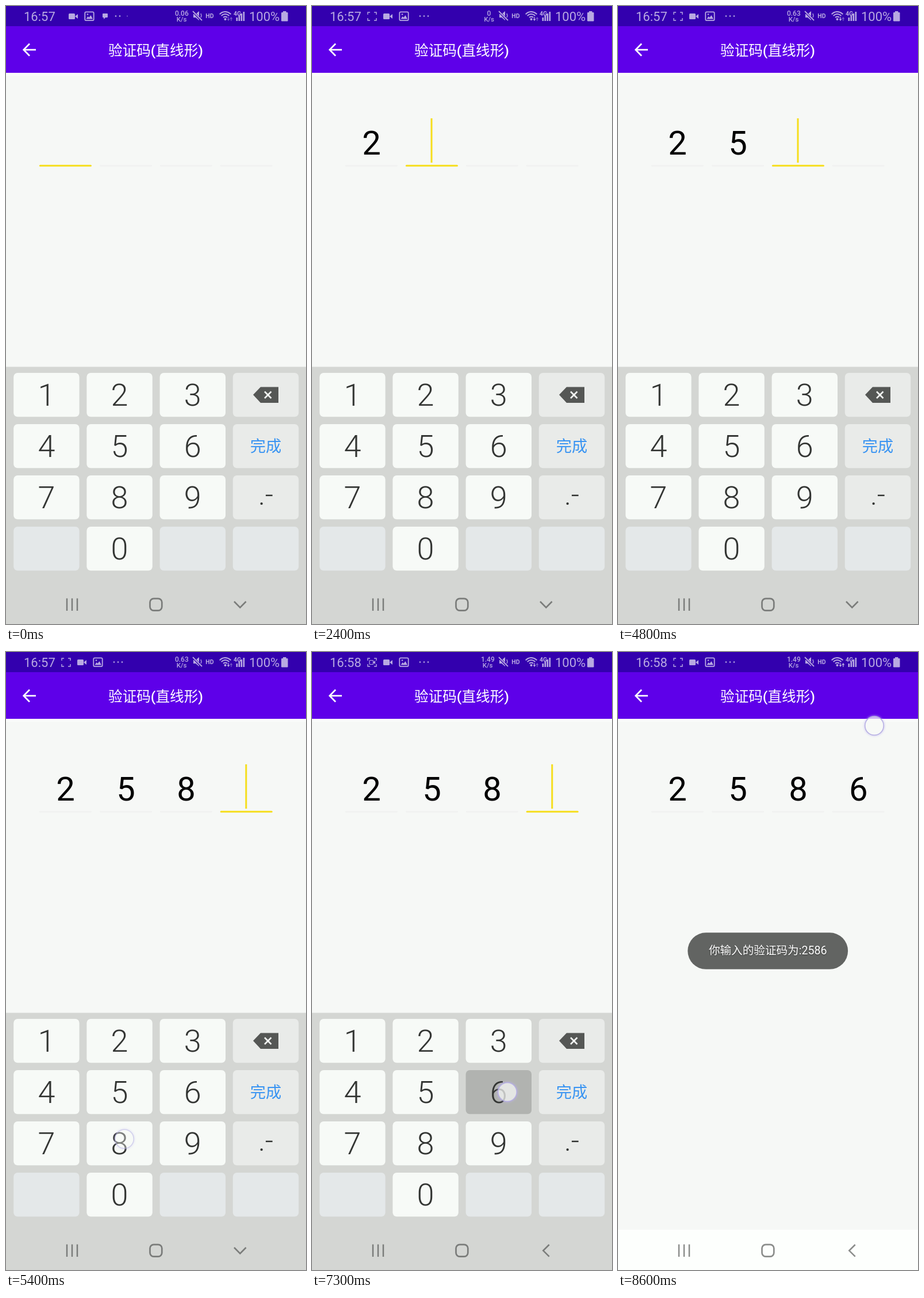
An HTML page with a canvas for the animation above (8800 ms loop, 522 px wide and 1073 px high).

```html
<!DOCTYPE html>
<html lang="zh-CN">
<head>
<meta charset="utf-8">
<title>验证码</title>
<style>
  html, body { margin: 0; width: 100%; height: 100%; overflow: hidden; background: #f6f8f6; }
  canvas { display: block; width: 522px; height: 1073px; }
</style>
</head>
<body>
<canvas id="stage" width="522" height="1073"></canvas>
<script>
const ctx = document.getElementById('stage').getContext('2d');
const LOOP = 8800;
const FONT = 'Roboto, "Noto Sans CJK SC", "Noto Sans CJK", sans-serif';
const YELLOW = '#f6de1c', STATUS = '#b8a9e2';
const KEYS = ['1', '2', '3', 'del', '4', '5', '6', '完成', '7', '8', '9', '.-', '', '0', '', ''];
const CELLS = [103.5, 208.5, 313.5, 418.3];

// Digits appear when their key is released
const ENTRIES = [[1700, '2'], [3420, '5'], [5360, '8'], [7400, '6']];
const CURSOR_ON = [[200, 700], [1200, 1700], [2200, 2800], [3300, 3420], [3800, 4300],
  [4800, 5300], [5360, 5800], [6300, 6800], [7300, 7400]];
const TOUCHES = [
  { x: 200, y: 675, down: 1500, up: 1680, key: 1 },
  { x: 203, y: 764, down: 3290, up: 3410, key: 5 },
  { x: 206, y: 845.5, down: 5180, up: 5320, key: 9 },
  { x: 340, y: 764, down: 7200, up: 7350, key: 6 },
  { x: 446, y: 128, down: 8560, up: 9000, key: -1 }
];

const clamp = v => Math.max(0, Math.min(1, v));
const mix = (a, b, k) => a + (b - a) * k;
const ramp = (t, a, b) => clamp((t - a) / (b - a));

function rect(x, y, w, h, color) {
  ctx.fillStyle = color;
  ctx.fillRect(x, y, w, h);
}

function round(x, y, w, h, r, color) {
  ctx.beginPath();
  ctx.roundRect(x, y, w, h, r);
  ctx.fillStyle = color;
  ctx.fill();
}

function poly(pts, color) {
  ctx.beginPath();
  pts.forEach(p => ctx.lineTo(p[0], p[1]));
  ctx.fillStyle = color;
  ctx.fill();
}

function line(pts, color, width) {
  ctx.beginPath();
  pts.forEach(p => ctx.lineTo(p[0], p[1]));
  ctx.strokeStyle = color;
  ctx.lineWidth = width;
  ctx.stroke();
}

function dot(x, y, r, color) {
  ctx.beginPath();
  ctx.arc(x, y, r, 0, Math.PI * 2);
  ctx.fillStyle = color;
  ctx.fill();
}

function text(s, x, y, size, color, weight = 400, align = 'center') {
  ctx.font = `${weight} ${size}px ${FONT}`;
  ctx.textAlign = align;
  ctx.fillStyle = color;
  ctx.fillText(s, x, y);
}

function faded(alpha, draw) {
  if (alpha <= 0) return;
  ctx.save();
  ctx.globalAlpha *= alpha;
  draw();
  ctx.restore();
}

function camera(x, y, k) {
  round(x, y, 11 * k, 10 * k, 1.5 * k, STATUS);
  poly([[x + 11 * k, y + 5 * k], [x + 16 * k, y + k], [x + 16 * k, y + 9 * k]], STATUS);
}

function brackets(full) {
  const l = 97, r = 112, t = 11, b = 25;
  for (const [x, dx] of [[l, 4], [r, -4]])
    for (const [y, dy] of [[t, 4], [b, -4]])
      line([[x + dx, y], [x, y], [x, y + dy]], STATUS, 1.4);
  if (full) {
    ctx.beginPath();
    ctx.roundRect(100, 14.5, 6.5, 7, 1);
    ctx.strokeStyle = STATUS;
    ctx.lineWidth = 1.2;
    ctx.stroke();
    poly([[106, 18], [110, 15], [110, 21]], STATUS);
  }
}

function leftIcons(t) {
  const k = ramp(t, 50, 450), dx = 15 * k;
  faded(ramp(t, 200, 450), () => brackets(t >= 900 && (t + 100) % 1000 < 500));
  camera(109 + dx, 13, 1);
  const x = 136.5 + dx;
  ctx.beginPath();
  ctx.roundRect(x + .8, 10.3, 15.4, 14.8, 2);
  ctx.strokeStyle = STATUS;
  ctx.lineWidth = 1.8;
  ctx.stroke();
  poly([[x + 3, 22.5], [x + 6, 18], [x + 8, 20], [x + 11, 16], [x + 14.5, 22.5]], STATUS);
  dot(x + 5.5, 14.5, 1.3, STATUS);
  faded(1 - ramp(t, 50, 350), () => {
    round(168 + dx, 13, 9, 7, 1, STATUS);
    poly([[170 + dx, 19], [174 + dx, 19], [170 + dx, 23]], STATUS);
  });
  dot(mix(191, 188, k), 17.5, 1.3, STATUS);
  dot(mix(198, 195, k), 17.5, 1.3, STATUS);
  dot(mix(211, 202, k), 17.5, mix(.8, 1.3, k), STATUS);
}

function rightIcons(t) {
  const speed = t < 1200 ? '0.06' : t < 4200 ? '0' : t < 7200 ? '0.63' : '1.49';
  const wide = speed.length > 1;
  text(speed, wide ? 305.8 : 308, 17, 12, STATUS, 500);
  text('K/s', wide ? 305.5 : 308, 27, 11.5, STATUS, 500);

  // Muted speaker
  poly([[326, 14], [330, 14], [336, 9], [336, 25], [330, 20], [326, 20]], STATUS);
  line([[324, 8], [341, 26]], '#3300ae', 4);
  line([[325, 9], [341, 25]], STATUS, 1.8);
  line([[339, 13], [340, 17], [339, 20]], STATUS, 1.3);

  text('HD', 354.5, 21, 10.5, STATUS, 700);
  for (const r of [4.5, 9, 13]) {
    ctx.beginPath();
    ctx.arc(381.5, 23, r, -Math.PI * .77, -Math.PI * .23);
    ctx.strokeStyle = STATUS;
    ctx.lineWidth = 2;
    ctx.stroke();
  }
  dot(381.5, 23, 2, STATUS);

  // Data arrows
  const dim = '#7459c8';
  const down = t >= 2400 ? STATUS : dim, up = t >= 8400 ? STATUS : dim;
  line([[387, 19], [387, 25]], down, 1.3);
  poly([[384.5, 22.5], [389.5, 22.5], [387, 26]], down);
  line([[391.8, 20], [391.8, 26]], up, 1.3);
  poly([[389.3, 22.5], [394.3, 22.5], [391.8, 19]], up);

  text('4G', 402.5, 17, 10.5, STATUS, 700);
  [6, 9, 13, 16].forEach((h, i) => rect(400.5 + i * 4, 26 - h, 2.6, h, STATUS));
  text('100%', 423, 26, 22, STATUS, 400, 'left');
  round(479, 11, 11.5, 15.5, 1.2, STATUS);
  rect(482, 9, 5.5, 3, STATUS);
}

function header(t) {
  rect(0, 0, 522, 35, '#3300ae');
  rect(0, 35, 522, 81, '#5e00e9');
  text(t < 6000 ? '16:57' : '16:58', 31, 26, 22, STATUS, 400, 'left');
  leftIcons(t);
  rightIcons(t);
  line([[52, 76], [31, 76]], '#fff', 2.7);
  line([[41, 65.5], [30.7, 76], [41, 86.5]], '#fff', 2.7);
  text('验证码(直线形)', 260.5, 85.5, 24.6, '#fff', 500);
}

function codeField(t) {
  const typed = ENTRIES.filter(e => t >= e[0]);
  CELLS.forEach((x, i) => {
    const active = i === typed.length;
    round(x - 45.6, 275.8, 91, 3, 1.5, active ? YELLOW : '#f1f2f1');
    if (typed[i]) text(typed[i][1], x, 257.5, 58, '#000');
    if (active && CURSOR_ON.some(([a, b]) => t >= a && t < b))
      rect(x - 2, 195, 3, 77, YELLOW);
  });
}

function keyboard(t) {
  const k = ramp(t, 7320, 7490);
  if (k === 1) return;
  ctx.save();
  ctx.translate(0, 447 * k * k);
  rect(0, 626.5, 522, 447, '#d4d6d3');
  const pressed = TOUCHES.find(p => t >= p.down && t < p.up);
  KEYS.forEach((label, i) => {
    const col = i % 4, x = 13.2 + col * 127.2, y = 637 + Math.floor(i / 4) * 89;
    const cx = x + 57.2;
    let color = label === '' ? '#e4e8e9' : col === 3 ? '#e9ebe9' : '#f7faf7';
    if (pressed && pressed.key === i) color = '#b1b3b0';
    round(x, y, 114.4, 76.3, 7, color);
    if (label === 'del') {
      poly([[430, 675], [443, 661.5], [474, 661.5], [474, 689], [443, 689]], '#555755');
      line([[450, 669.5], [461.5, 681]], '#f4f6f4', 2.6);
      line([[461.5, 669.5], [450, 681]], '#f4f6f4', 2.6);
    } else if (label === '完成') {
      text(label, cx, y + 48, 27.2, '#3793f2');
    } else if (label === '.-') {
      text(label, cx, y + 51, 50, '#333533', 300);
    } else {
      text(label, cx, y + 57.3, 54, '#333533', 300);
    }
  });
  ctx.restore();
}

function navBar(t) {
  const open = t < 7400;
  const color = open ? '#7a7c7a' : '#8b8d8b';
  rect(0, 1003, 522, 70, open ? '#d4d6d3' : '#fdfffd');
  for (const x of [106, 115, 124]) line([[x, 1028.5], [x, 1050]], color, 2.5);
  ctx.beginPath();
  ctx.roundRect(250.5, 1028.8, 20.8, 20.8, 6.5);
  ctx.lineWidth = 2.7;
  ctx.stroke();
  if (t < 7250) line([[397, 1034], [407.3, 1044.5], [417.6, 1034]], color, 2.6);
  else line([[412.7, 1029], [402.3, 1039.3], [412.7, 1049.6]], color, 2.6);
}

function toast(t) {
  faded(ramp(t, 7440, 7960), () => {
    round(121.3, 487.3, 278.8, 63.5, 31.7, '#626462');
    ctx.shadowColor = 'rgba(0,0,0,.45)';
    ctx.shadowBlur = 2;
    ctx.shadowOffsetY = 1;
    text('你输入的验证码为:2586', 260.7, 525, 19.6, '#fff');
  });
}

function touches(t) {
  for (const p of TOUCHES) {
    if (t < p.down) continue;
    faded(1 - ramp(t, p.up, p.up + 170), () => {
      const glow = ctx.createRadialGradient(p.x, p.y, 15, p.x, p.y, 21);
      glow.addColorStop(0, 'rgba(190,180,240,.45)');
      glow.addColorStop(1, 'rgba(190,180,240,0)');
      ctx.beginPath();
      ctx.arc(p.x, p.y, 21, 0, Math.PI * 2);
      ctx.arc(p.x, p.y, 16, 0, Math.PI * 2, true);
      ctx.fillStyle = glow;
      ctx.fill();
      dot(p.x, p.y, 16.5, 'rgba(248,250,248,.72)');
      ctx.beginPath();
      ctx.arc(p.x, p.y, 16.3, 0, Math.PI * 2);
      ctx.strokeStyle = 'rgba(178,170,226,.85)';
      ctx.lineWidth = 1.8;
      ctx.stroke();
    });
  }
}

function draw(t) {
  rect(0, 0, 522, 1073, '#f6f8f6');
  rect(0, 116, 522, 5, '#fafcfa');
  codeField(t);
  keyboard(t);
  navBar(t);
  toast(t);
  header(t);
  touches(t);
}

const start = performance.now();
function tick() {
  draw((performance.now() - start) % LOOP);
  requestAnimationFrame(tick);
}
tick();
</script>
</body>
</html>
```
